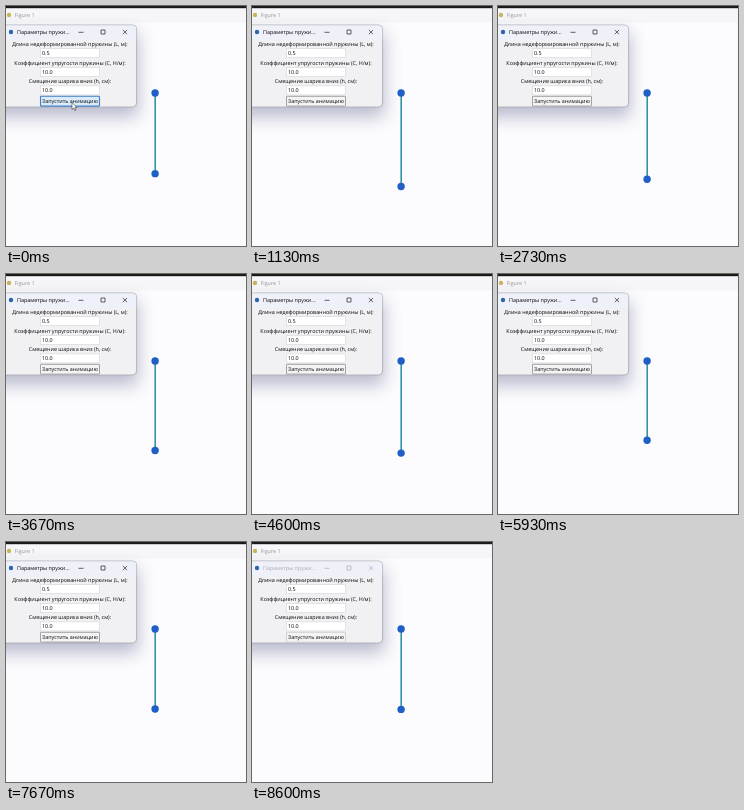
Recreate the animation shown at these times as an HTML page. Size 240 by 240 pixels, loop 8.67 s.

```html
<!DOCTYPE html>
<html lang="ru">
<head>
<meta charset="utf-8">
<title>Колебания пружины</title>
<style>
  html, body { margin: 0; width: 100%; height: 100%; overflow: hidden; background: #fcfcfe; }
  svg { display: block; width: 100%; height: 100%; }
  text { font: 5.4px "Open Sans", "Noto Sans", sans-serif; fill: #080808; text-rendering: geometricPrecision; }
  .label { text-anchor: middle; }
  .field { fill: #fff; stroke: #d4d4da; stroke-width: .6; }
  .controls { fill: none; stroke: #222; stroke-width: .7; }
  .inactive #caption { fill: #a9abb3; }
  .inactive .controls { stroke: #a9abb3; }
  #button { fill: #f4f4f5; stroke: #8c8c92; stroke-width: .8; }
  .hover #button { fill: #dcebfa; stroke: #3f7fc4; stroke-width: 1.1; }
  .inactive #button { stroke: #c9c9cf; }
</style>
</head>
<body>
<svg viewBox="0 0 240 240">
  <defs>
    <filter id="blur" x="-30%" y="-40%" width="160%" height="180%">
      <feGaussianBlur stdDeviation="8.5"/>
    </filter>
  </defs>

  <!-- Plot window -->
  <rect width="240" height="240" fill="#fcfcfe"/>
  <rect width="240" height="16.5" fill="#f6f5f8"/>
  <rect width="240" height="2.2" fill="#1c1916"/>
  <circle cx="3" cy="9" r="2.2" fill="#c9b45c"/>
  <text x="8.5" y="11" style="fill:#96949a">Figure 1</text>

  <!-- Spring -->
  <line id="spring" x1="149.2" y1="87" x2="149.2" y2="168" stroke="#3492a6" stroke-width="1.6"/>
  <circle cx="149.1" cy="87" r="3.7" fill="#1f5fc6"/>
  <circle id="ball" cx="149.1" cy="168" r="3.7" fill="#1f5fc6"/>

  <!-- Parameter dialog -->
  <g id="dialog">
    <rect x="-20" y="27" width="152" height="84" fill="#6a6e94" opacity=".46" filter="url(#blur)"/>
    <rect x="-6" y="19" width="136.6" height="82" rx="4" fill="#f1f1f4" stroke="#a5a6ae" stroke-width=".8"/>
    <path d="M0 19.4H127q3.2 0 3.2 3.6V33.5H0Z" fill="#eff1fa"/>
    <circle cx="5" cy="26" r="2.2" fill="#2c65a8"/>
    <text id="caption" x="11" y="28">Параметры пружи...</text>
    <path class="controls" d="M72.5 26.3h5M95 24h4v4h-4zM116.8 24l4.2 4.2m0-4.2l-4.2 4.2"/>
    <g id="form"></g>
    <rect id="button" x="34.5" y="90.3" width="59" height="9.8" rx=".6"/>
    <text class="label" x="64" y="97.2">Запустить анимацию</text>
  </g>
  <path id="cursor" d="M66 96.5v7l1.7-1.5 1.1 2.5 1.1-.5-1.1-2.4h2.2z" fill="#fff" stroke="#222" stroke-width=".5"/>
</svg>

<script>
const LOOP = 8670, FPS = 15;
const CENTER = 173, AMPLITUDE = 8.3, FREQUENCY = 1.14, PHASE = -0.362;
const HOVER_END = 0.3, FOCUS_END = 8.45, MOTION_END = 8.535;

const byId = id => document.getElementById(id);
const [ball, spring, dialog, cursor] = ["ball", "spring", "dialog", "cursor"].map(byId);

const fields = [
  ["Длина недеформированной пружины (L, м):", "0.5", 40.2],
  ["Коэффициент упругости пружины (C, Н/м):", "10.0", 58.8],
  ["Смещение шарика вниз (h, см):", "10.0", 77.4],
];
byId("form").innerHTML = fields.map(([label, value, y]) => `
  <text class="label" x="64" y="${y}">${label}</text>
  <rect class="field" x="34.5" y="${y + 2.5}" width="59" height="9"/>
  <text x="36" y="${y + 9}">${value}</text>`).join("");

function draw(ms) {
  // The picture advances in steps of 1/15 s; 5 ms absorbs rounded step times.
  const time = Math.floor((ms % LOOP + 5) * FPS / 1000) / FPS;
  const cycles = FREQUENCY * Math.min(time, MOTION_END) + PHASE;
  const y = CENTER + AMPLITUDE * Math.cos(2 * Math.PI * cycles);
  ball.setAttribute("cy", y);
  spring.setAttribute("y2", y);

  const hover = time < HOVER_END;
  dialog.classList.toggle("hover", hover);
  dialog.classList.toggle("inactive", time > FOCUS_END);
  cursor.style.display = hover ? "" : "none";
}

let start;
function tick(now) {
  start ??= now;
  draw(now - start);
  requestAnimationFrame(tick);
}
draw(0);
requestAnimationFrame(tick);
</script>
</body>
</html>
```
